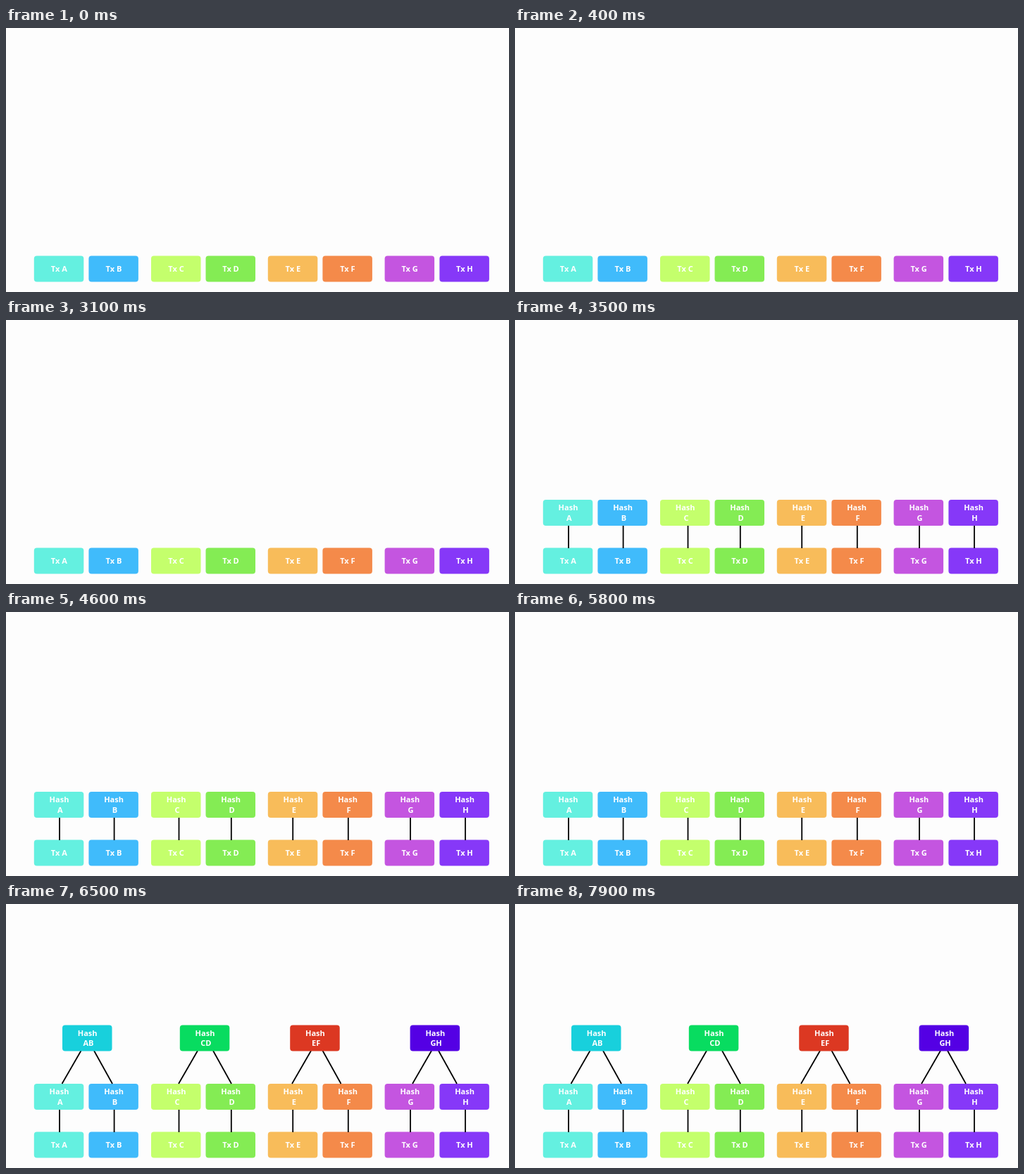
Recreate the animation shown at these times as an HTML page. Size 714 by 376 pixels, loop 8000 ms.

```html
<!DOCTYPE html>
<html lang="en">
<head>
<meta charset="utf-8">
<style>
  html, body { margin: 0; width: 100%; height: 100%; overflow: hidden; background: #fdfdfd; }
  svg { display: block; }
  rect { width: 70.5px; height: 37px; }
  text { font: 700 11px "Open Sans", sans-serif; fill: #fff; text-anchor: middle; }
  line { stroke: #000; stroke-width: 1.8; }
</style>
</head>
<body>
<svg width="714" height="376" viewBox="0 0 714 376">
  <g id="transactions"></g>
  <g id="hashes"></g>
  <g id="pairs"></g>
</svg>
<script>
const LOOP = 8000, HASHES_AT = 3500, PAIRS_AT = 5900;
const [transactions, hashes, pairs] =
  ["transactions", "hashes", "pairs"].map(id => document.getElementById(id));

// letter, box left edge, colour, connector x
const leaves = [
  ["A", 39.8, "#64f0e0", 76], ["B", 117.4, "#40bbfb", 153.6],
  ["C", 206, "#c4ff6c", 245.5], ["D", 283.5, "#84ec54", 319.8],
  ["E", 371.8, "#f8bc5a", 407.2], ["F", 449.4, "#f48a4a", 485.8],
  ["G", 537.6, "#c455e0", 574], ["H", 615.4, "#8638f8", 652],
];
// letters, box left edge, colour, tops of the left and right branches
const parents = [
  ["AB", 80, "#18d0dc", 106.5, 125], ["CD", 246.8, "#08dc60", 272, 294],
  ["EF", 403.2, "#dc3822", 433, 449.5], ["GH", 573.6, "#5400e4", 604, 614],
];

function add(parent, tag, attrs, content = "") {
  const el = document.createElementNS("http://www.w3.org/2000/svg", tag);
  for (const key in attrs) el.setAttribute(key, attrs[key]);
  el.textContent = content;
  parent.append(el);
}
const box = (g, x, y, fill) => add(g, "rect", { x, y, rx: 4, fill });
const label = (g, x, y, content) => add(g, "text", { x, y }, content);
const link = (g, x1, y1, x2, y2) => add(g, "line", { x1, y1, x2, y2 });

function hashBox(g, x, y, fill, letters) {
  box(g, x, y, fill);
  label(g, x + 35.7, y + 15, "Hash");
  label(g, x + 37, y + 29.5, letters);
}

for (const [letter, x, fill, linkX] of leaves) {
  box(transactions, x, 324.5, fill);
  label(transactions, x + 35.5, 346.5, "Tx " + letter);
  link(hashes, linkX, 292.5, linkX, 325);
  hashBox(hashes, x, 256, fill, letter);
}
for (const [letters, x, fill, left, right] of parents) {
  link(pairs, left, 209, left - 27, 256);
  link(pairs, right, 209, right + 26, 256);
  hashBox(pairs, x, 172.5, fill, letters);
}

function draw() {
  const t = performance.now() % LOOP;
  hashes.style.display = t >= HASHES_AT ? "" : "none";
  pairs.style.display = t >= PAIRS_AT ? "" : "none";
  requestAnimationFrame(draw);
}
draw();
</script>
</body>
</html>
```
